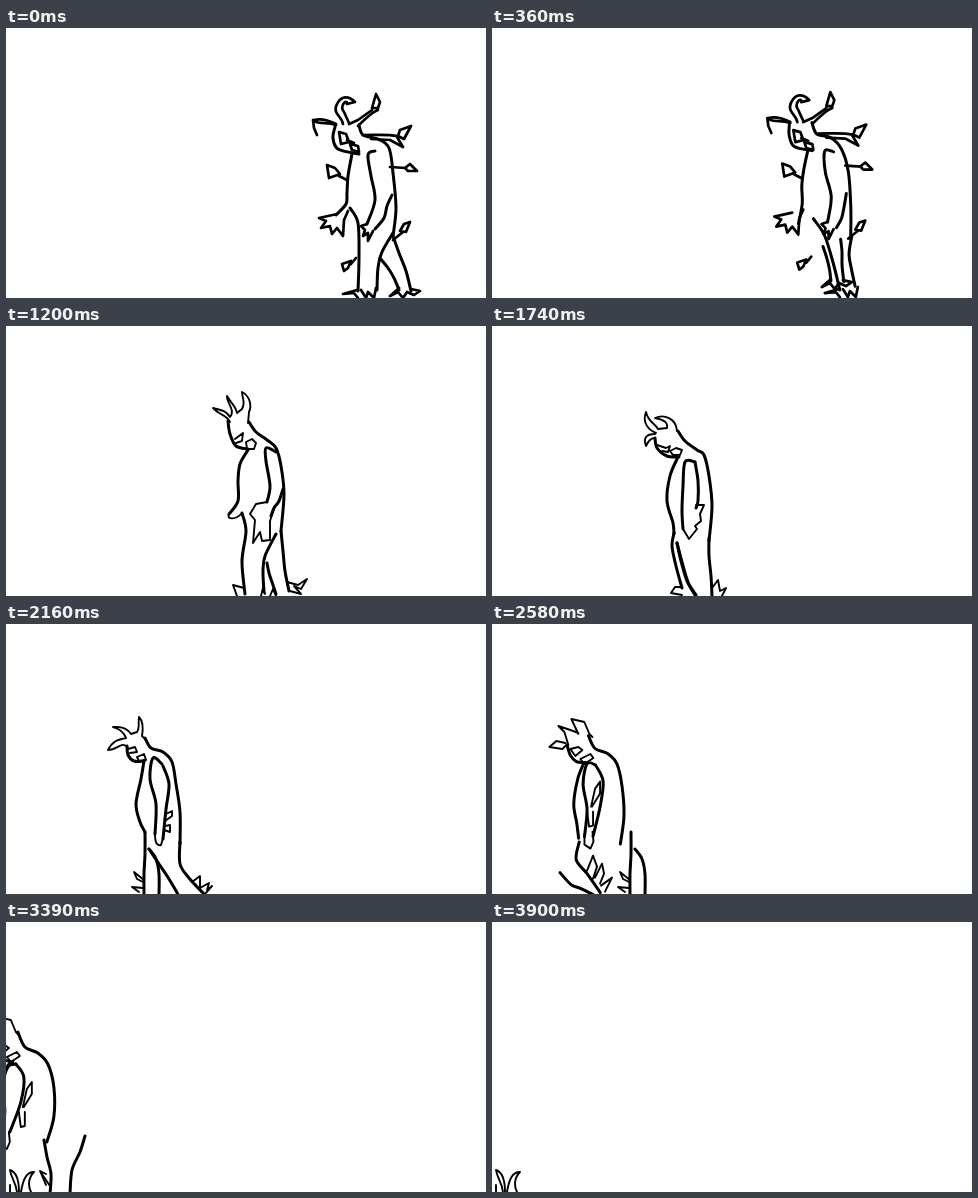
Recreate the animation shown at these times as an HTML page. Size 480 by 270 pixels, loop 3930 ms.

```html
<!DOCTYPE html>
<html lang="en">
<head>
<meta charset="utf-8">
<title>Walking creature</title>
<style>
html, body { margin: 0; width: 100%; height: 100%; overflow: hidden; background: #fff; }
svg { display: block; width: 480px; height: 270px; }
path { fill: none; stroke: #000; stroke-linecap: round; stroke-linejoin: round; }
</style>
</head>
<body>
<svg id="stage" viewBox="0 0 480 270"></svg>
<script>
const LOOP = 3930, STEP = 30;
const keyTimes = [0, 750, 1200, 1740, 2160, 2970, 3900];

// Body lines: one row of points per key pose, morphed between poses.
const lines = {
  face: [
    '329,99 327,110 332,121 353,126',
    '263,95 265,105 270,116 284,119',
    '222,95 224,108 230,120 242,123',
    '163,112 165,122 175,130 187,131',
    '121,122 122,131 128,137 138,137',
    '33,122 38,132 44,138 52,140'],
  back: [
    '353,97 357,107 372,111 383,120 387,145 390,180 387,208',
    '284,92 290,105 302,108 313,122 323,142 325,178 328,215',
    '243,96 250,106 261,114 270,122 275,140 278,168 275,205',
    '186,105 193,115 205,124 212,129 217,150 220,180 217,215',
    '139,114 145,124 157,128 166,138 170,160 174,188 174,220',
    '57,110 64,125 77,131 87,142 93,165 93,195 86,220'],
  belly: [
    '346,126 342,148 341,165 340,176 330,187',
    '283,119 279,135 276,150 278,175 281,205',
    '242,124 234,138 232,155 232,175 223,188',
    '186,131 178,150 175,175 181,197 182,208',
    '138,137 135,155 130,180 134,198 139,208',
    '49,141 40,155 37,180 39,200 38,220'],
  armFront: [
    '369,123 362,127 365,148 369,172 361,196',
    '312,125 301,119 299,140 307,165 308,192',
    '270,126 260,122 260,135 264,160 261,176',
    '203,136 193,136 191,160 190,185 191,203',
    '156,140 147,134 144,155 150,180 149,210',
    '55,142 47,145 42,165 44,190 40,215'],
  armBack: [
    '386,167 381,178 378,190 369,201',
    '320,164 321,178 319,190 318,198',
    '277,163 273,175 268,182 265,190',
    '203,136 206,155 206,175 204,182',
    '157,142 163,160 160,185 157,215',
    '55,142 63,155 60,180 49,210'],
  legAFront: [
    '374,230 382,240 388,250 393,262',
    '281,205 280,225 279,245 276,262',
    '261,237 263,247 266,256 270,268',
    '182,207 180,220 184,240 190,262',
    '143,225 153,240 163,255 173,272',
    '67,249 78,261 88,265 100,271'],
  legABack: [
    '387,208 393,225 400,243 405,263',
    '304,215 300,228 292,243 290,262',
    '275,205 277,225 279,245 283,265',
    '185,217 189,235 195,255 203,269',
    '174,218 174,240 183,254 198,270',
    '86,218 83,236 94,250 107,269'],
  legBFront: [
    '344,180 352,195 353,230 352,263',
    '295,203 310,222 328,243 343,261',
    '236,187 240,205 236,235 239,268',
    '185,217 190,236 196,256 204,269',
    '139,208 139,230 138,250 138,272',
    '38,218 41,235 45,252 44,272'],
  legBBack: [
    '387,205 376,224 372,240 371,262',
    '328,213 335,228 345,243 354,254',
    '270,208 259,230 257,245 258,266',
    '217,212 217,230 219,250 220,270',
    '143,225 150,235 153,250 153,272',
    '79,214 74,230 66,248 64,272']
};

// Horns, hands and feet: redrawn for each pose, carried by a body line's end.
const details = {
  head: { on: 'face', at: 0, art: [
    'M330,97C322,94 316,96 310,94L307,92 308,100 311,107M308,92C316,90 324,93 330,96M337,96C336,88 326,86 331,76C335,68 342,67 349,74L341,76C341,70 333,78 338,84L343,95M343,96L352,92 366,82M352,98C358,92 366,84 372,82M366,80L370,66 374,74 372,80ZM333,104l7,2 3,8 -8,2zM344,116l8,2 1,6 -7,-2zM341,112l7,3',
    'M265,96C258,88 254,84 246,82C256,80 263,83 267,91M268,92C260,82 262,72 268,69C264,80 270,88 274,92M274,91C278,84 274,76 270,69C278,70 285,80 284,92M266,102L274,100 277,105 271,109ZM275,112L283,108 289,112 286,117 278,117Z',
    'M224,96C220,88 214,90 207,82C214,84 220,84 224,91M224,91C230,84 220,76 221,70C224,76 230,80 231,87L236,83C240,76 236,72 236,66C244,70 246,80 243,86L242,97M229,113L237,107 236,115 230,117M240,116L246,113 250,117 248,123 241,123Z',
    'M163,112C158,112 156,116 154,120C151,112 154,108 163,108M164,107C156,104 150,96 154,86C156,96 162,96 166,103L175,102C176,96 172,94 163,92C172,88 184,92 185,105M165,119L174,122 178,120 176,126 170,125M178,125L184,122 190,124 188,129 181,129Z',
    'M122,124C116,116 112,126 102,126C106,118 110,116 120,114M120,114C118,108 112,104 107,103C118,102 122,106 125,110L131,108C134,104 132,98 133,93C138,98 137,106 136,112L140,116M122,125L129,123 131,128 124,129M131,133L138,130 140,136 133,137Z',
    'M33,120L28,125 15,123 22,117 31,119M34,121L30,108 24,102 36,106 44,109M44,110L37,95 50,98 55,110 58,113M36,125L44,123 48,126 41,132ZM46,135L56,130 59,134 50,140Z'] },
  leaves: { on: 'back', at: 4, art: [
    'M357,107C370,107 382,106 391,108M392,108L394,102 405,98 398,111ZM365,111L384,112 397,119 391,109M384,139L400,140M399,140L404,136 411,143 402,143ZM321,137L329,140 334,146 323,150ZM333,148L341,152M387,212L397,204M394,203L398,196 404,194 400,204ZM350,230L345,236M336,236L345,233 342,240 338,243ZM331,186L313,190 320,193 315,200 324,198 326,206 331,200 337,208 338,192 342,183',
    '', 'M223,188C220,194 230,194 236,187', '',
    'M160,190L166,187 166,192 159,197M159,202L164,201 164,208 158,206',
    'M62,185L66,167 71,160 71,172 63,185M58,190L60,205 64,204 64,190'] },
  hand: { on: 'armFront', at: 4, art: [
    'M361,196L355,198 359,202 357,208 362,205 362,213 367,203',
    'M308,191L300,200 308,197 312,199 315,209 315,200 321,210 318,196M313,197L316,190',
    'M261,176L250,178 244,188 249,194 247,217 254,206 256,215 264,214 264,195 268,183',
    'M204,179L212,179 208,188 209,195 203,200 205,203 197,213 191,203',
    'M149,210C149,219 151,222 155,221L157,214',
    'M40,213L40,223 46,227 49,220 48,210'] },
  footA: { on: 'legAFront', at: 3, art: [
    'M393,260L384,268 392,264 397,270 401,264 408,267 414,263 405,261',
    'M276,262L266,269 278,266 284,270 289,264 299,267 290,261',
    'M264,270L267,263 270,270M281,256L292,259 301,253 295,263 288,260 295,268 284,265',
    'M190,261L183,261 179,267 190,269',
    'M186,258L194,252 194,264 203,259 201,266 206,262 199,270',
    'M94,247L100,232 104,243 100,255M102,254L109,240 111,250 107,260M108,262L119,254 112,268',
    'M4,270L4,263M4,248C10,250 13,258 13,270M4,248C5,256 10,260 11,270M15,270C17,258 20,250 28,250C22,256 22,264 25,270'] },
  footB: { on: 'legBFront', at: 3, art: [
    'M351,262L337,266 348,265 352,270M355,262L360,270 362,264 368,270 370,260',
    'M343,260L337,269 346,266 352,269 357,264 368,263M354,253L354,262',
    'M238,262L227,259 231,270M255,270L257,262 259,268',
    'M220,262L226,254 228,265 234,262 230,270',
    'M138,256L128,248 131,255 137,258M137,264L126,263 133,268',
    'M44,264L34,249 40,252M34,249L40,263'] }
};

// Share of each stretch between poses in which a leg moves.
const swings = {
  A: [[.1, .9], [.1, .9], [.1, .9], [.1, .9], [.1, .55], [.05, .4]],
  B: [[.1, .9], [.1, .9], [.1, .9], [.1, .9], [.55, .95], [.45, .85]]
};

const stage = document.getElementById('stage');
const parse = row => row.split(' ').map(p => p.split(',').map(Number));
const legOf = name => (name.match(/^leg([AB])/) || [])[1];
const addPath = width => {
  const path = document.createElementNS(stage.namespaceURI, 'path');
  path.setAttribute('stroke-width', width);
  return stage.appendChild(path);
};

const poses = {}, linePaths = {}, detailPaths = {};
for (const name in lines) {
  poses[name] = lines[name].map(parse);
  const exit = legOf(name) ? 112 : 100;
  poses[name].push(poses[name][5].map(([x, y]) => [x - exit, y]));
  linePaths[name] = addPath(3);
}
for (const name in details) detailPaths[name] = addPath(2);

function smoothPath(points) {
  const at = i => points[Math.max(0, Math.min(points.length - 1, i))];
  let d = 'M' + points[0];
  for (let i = 0; i < points.length - 1; i++) {
    const [a, b, c, e] = [at(i - 1), at(i), at(i + 1), at(i + 2)];
    const c1 = b.map((v, k) => v + (c[k] - a[k]) / 6);
    const c2 = c.map((v, k) => v - (e[k] - b[k]) / 6);
    d += `C${c1} ${c2} ${c}`;
  }
  return d;
}

function legProgress(leg, segment, p) {
  const [from, to] = swings[leg][segment];
  const u = Math.max(0, Math.min(1, (p - from) / (to - from)));
  return u * u * (3 - 2 * u);
}

function morph(name, segment, p) {
  const from = poses[name][segment], to = poses[name][segment + 1];
  const stride = Math.abs(to[3][0] - from[3][0]);
  const lift = legOf(name) && stride > 40 ? 9 * Math.sin(Math.PI * p) : 0;
  return from.map(([x, y], i) => [
    x + (to[i][0] - x) * p,
    y + (to[i][1] - y) * p - lift * i / 3
  ]);
}

function draw(time) {
  let segment = 0;
  while (segment < 5 && time >= keyTimes[segment + 1]) segment++;
  const p = (time - keyTimes[segment]) / (keyTimes[segment + 1] - keyTimes[segment]);
  const now = {}, progress = {};

  for (const name in lines) {
    const leg = legOf(name);
    progress[name] = leg ? legProgress(leg, segment, p) : p;
    now[name] = morph(name, segment, progress[name]);
    linePaths[name].setAttribute('d', smoothPath(now[name]));
  }
  for (const name in details) {
    const { on, at, art } = details[name];
    const pose = Math.min(art.length - 1, segment + (progress[on] >= .5 ? 1 : 0));
    const anchor = poses[on][pose][at], point = now[on][at];
    const path = detailPaths[name];
    path.setAttribute('d', art[pose]);
    path.setAttribute('stroke-width', pose ? 1.9 : 2.7);
    path.setAttribute('transform', `translate(${point[0] - anchor[0]} ${point[1] - anchor[1]})`);
  }
}

const start = performance.now();
function tick() {
  const elapsed = (performance.now() - start) % LOOP;
  draw(Math.floor(elapsed / STEP) * STEP);
  requestAnimationFrame(tick);
}
tick();
</script>
</body>
</html>
```
